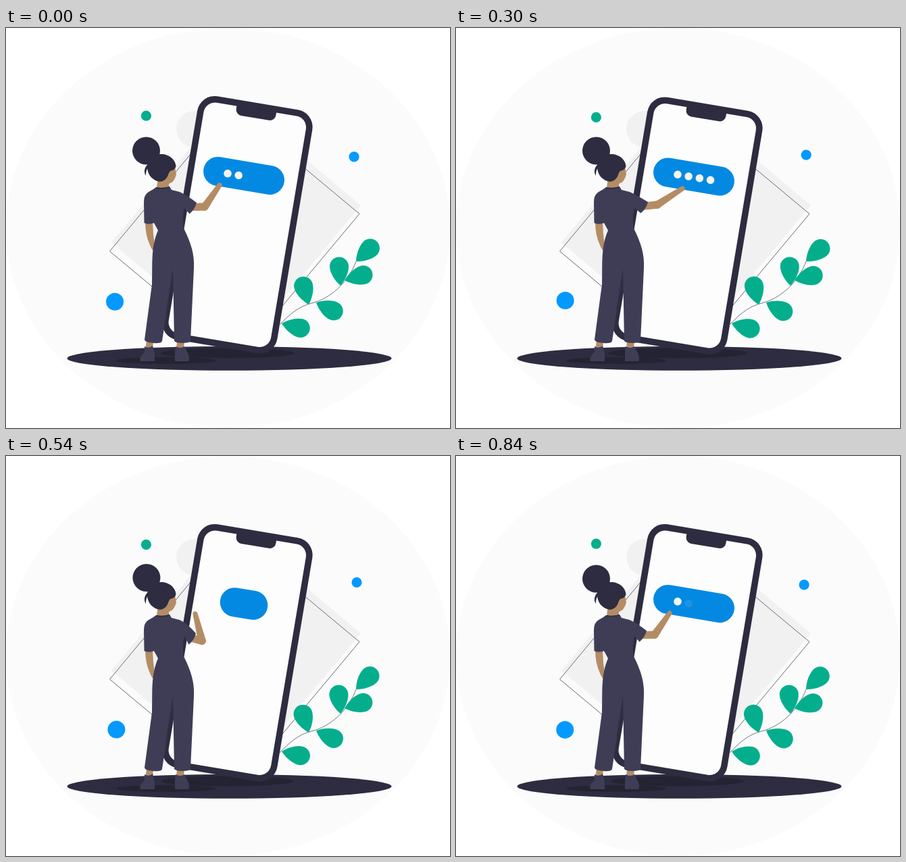
An HTML page with a canvas that plays this animation: 657 px wide and 593 px high, repeating every 0.87 s.

```html
<!DOCTYPE html>
<html lang="en">
<head>
<meta charset="utf-8">
<title>Passcode entry</title>
<style>
  html, body { margin: 0; width: 100%; height: 100%; overflow: hidden; background: #fff; }
  canvas { display: block; }
</style>
</head>
<body>
<canvas id="stage" width="657" height="593"></canvas>
<script>
const ctx = document.getElementById('stage').getContext('2d');
const LOOP = 870, STEP = 30, RAD = Math.PI / 180, TILT = 9.5 * RAD;
const INK = '#2d2c40', CLOTH = '#3f3d56', SKIN = '#b48c64';
const GREEN = '#04ae8d', BLUE = '#0489e2', SKY = '#0499ff', SHADE = '#242332';

const clamp = v => Math.max(0, Math.min(1, v));
const ramp = (from, to, t) => clamp((t - from) / (to - from));
const ease = (from, to, t) => { const p = ramp(from, to, t); return p * p * (3 - 2 * p); };
const mix = (a, b, p) => a + (b - a) * p;
const wave = (t, delay) => Math.sin(2 * Math.PI * (t - delay) / LOOP);

function ellipse(x, y, rx, ry, color) {
  ctx.fillStyle = color;
  ctx.beginPath();
  ctx.ellipse(x, y, rx, ry, 0, 0, 2 * Math.PI);
  ctx.fill();
}
const circle = (x, y, r, color) => ellipse(x, y, r, r, color);

function shape(d, color) {
  ctx.fillStyle = color;
  ctx.fill(new Path2D(d));
}

function line(d, color, width) {
  ctx.strokeStyle = color;
  ctx.lineWidth = width;
  ctx.stroke(new Path2D(d));
}

// Rounded box centred on the current origin.
function box(w, h, r, color) {
  ctx.fillStyle = color;
  ctx.beginPath();
  ctx.roundRect(-w / 2, -h / 2, w, h, r);
  ctx.fill();
}

function at(x, y, angle, draw) {
  ctx.save();
  ctx.translate(x, y);
  ctx.rotate(angle);
  draw();
  ctx.restore();
}

function drawBackdrop(press) {
  ctx.fillStyle = '#fff';
  ctx.fillRect(0, 0, 657, 593);
  ellipse(328.5, 296.5, 328.5, 296.5, '#fbfbfb');
  circle(279, 150, 27, '#f1f1f1');
  shape('M156 318L335 103L525 263L346 478Z', '#f1f1f1');
  line('M153.5 331L332 116L523 275.5L344 490Z', '#6b6a75', 1);
  ellipse(330.5, 489.8, 240, 18, INK);
  ellipse(237, 493, 73.5, 5, SHADE);
  ellipse(328, 482, 98 + press * 8, 7.5, SHADE);
}

function drawPhone(t, drop) {
  at(342.3, 291.7 + drop, TILT, () => {
    box(172.5, 366, 26, INK);
    box(153.5, 347, 17, '#fdfdfd');
    ctx.fillStyle = INK;
    ctx.beginPath();
    ctx.roundRect(-30, -175, 59.5, 14.5, [0, 0, 9, 9]);
    ctx.fill();
  });

  // The pill narrows, turns blue and widens again between entries.
  const narrow = t < 540 ? ramp(450, 540, t) ** 2.7 : (1 - ramp(540, 720, t)) ** 1.6;
  const green = t >= 330 && t < 540;
  const clock = t < 600 ? t + LOOP : t;
  at(352, 219 + drop, TILT, () => {
    box(121 - 50 * narrow, 43, 21.5, green ? GREEN : BLUE);
    for (let i = 0; i < 4; i++) {
      const born = 717 + 120 * i;
      ctx.globalAlpha = ramp(born, born + 30, clock) * (1 - ramp(1355, 1395, clock));
      circle(-24.2 + 16.4 * i, 0.8, 5.8, '#f4f4f4');
    }
  });
}

function drawLeaf(x, y, angle) {
  const d = 28.6, r = 14;
  at(x, y, angle, () => {
    ctx.fillStyle = GREEN;
    ctx.beginPath();
    ctx.moveTo(0, 0);
    ctx.bezierCurveTo(8, -8, d - 9, -r, d, -r);
    ctx.arc(d, 0, r, -Math.PI / 2, Math.PI / 2);
    ctx.bezierCurveTo(d - 9, r, 8, 8, 0, 0);
    ctx.fill();
  });
}

function drawPlant(t) {
  line('M404 441C418 426 432 413 452 408C480 401 506 378 518 346', '#77757f', 1);
  const sway = 0.033 * wave(t, 0);
  const leaf = (x, y, degrees) => drawLeaf(x, y, degrees * RAD + sway);
  leaf(408, 438, 14);
  leaf(448, 410, -106);
  leaf(459, 407, 26);
  leaf(495, 382, -94);
  leaf(501, 374, -16);
  leaf(518, 346, -43);
}

// Limb with round ends that tapers from radius r1 to r2.
function limb(x1, y1, r1, x2, y2, r2) {
  const a = Math.atan2(y2 - y1, x2 - x1), q = Math.PI / 2;
  ctx.fillStyle = SKIN;
  ctx.beginPath();
  ctx.arc(x1, y1, r1, a + q, a - q);
  ctx.arc(x2, y2, r2, a - q, a + q);
  ctx.fill();
}

function drawHead(lift) {
  shape('M225 221L223 237Q232 239 241 237V231Q249 229 252 217L250 206L236 210Z', SKIN);
  circle(207.5 + 0.4 * lift, 182 - 1.5 * lift, 20.5, INK);
  shape('M209 206C209 194 219 187 230 187C241 187 251 195 251.5 205C250 210 247 211 243 212' +
        'C240 215 240 220 237 223C234 227 228 229 224 227C215 224 209 216 209 206Z', INK);
  shape('M211 201C205 206 203 213 207 219C207 213 208 208 212 206Z', INK);
}

function drawWoman(t) {
  // The hand slides along the pill, drops back, then reaches out again.
  const reach = 1 - ease(300, 430, t) + ease(660, 810, t);
  const slide = t < 600 ? ramp(0, 300, t) ** 2 : 0;
  const elbow = [mix(290, 294 + 4 * slide, reach), mix(274, 265 - 3 * slide, reach)];
  const hand = [mix(280, 316 + 19 * slide, reach), mix(234, 233 + 5 * slide, reach)];
  const cuffX = mix(281, 282 + 2 * slide, reach), cuffY = mix(263, 259 - slide, reach);

  // feet and resting arm
  shape('M208 464H218L217 477H206ZM253 464H264L263 476H252Z', SKIN);
  shape('M205 472Q211 476 217 471L220 483V494H199Q196 488 205 481Z' +
        'M251 472Q258 476 264 472L270 484Q272 490 270 494H250L250 481Z', CLOTH);
  shape('M206 287L217 287L218 306L221 331Q217 332 213 322Q206 307 206 287Z', SKIN);

  drawHead(1 - reach);
  limb(cuffX - 9, cuffY + 6.5, 5.5, ...elbow, 5.8);
  limb(...elbow, 5.8, ...hand, 3.6);

  // jumpsuit
  shape('M218 239L222 236Q232 238 242 235L245 240L257 243Q268 248 ' +
        `${cuffX} ${cuffY}q-2.5 10 -10.5 16.5` +
        'L264 267Q260 281 263 297C274 319 279 336 278 356L273 464Q272 467 261 467Q251 467 249 464' +
        'L247 358L231 464Q230 468 218 467Q205 466 205 462L216 380C217 350 214 325 225 300' +
        'L219 289Q211 292 204.5 289L204 258Q204 247 211 243Z', CLOTH);
  line('M222 237Q232 239 242 236', INK, 1.5);
  shape('M247 355L241 390L236 425L245 380Z', '#343349');
}

function drawFloaters(t) {
  circle(207.4, 131.2 + 1.3 * wave(t, 120), 7.6, GREEN);
  const drift = wave(t, 235);
  circle(517.2 + 2.2 * drift, 189 - 1.9 * drift, 7.6, SKY);
  circle(162 + 1.4 * wave(t, 330), 405.2 - 1.2 * wave(t, 60), 13, SKY);
}

function render(t) {
  const press = Math.sin(Math.PI * ramp(210, 510, t)) ** 2;
  drawBackdrop(press);
  drawPhone(t, 2.3 * press);
  drawPlant(t);
  drawWoman(t);
  drawFloaters(t);
}

let start;
function tick(now) {
  start ??= now;
  render(Math.floor(((now - start) % LOOP) / STEP) * STEP);
  requestAnimationFrame(tick);
}
render(0);
requestAnimationFrame(tick);
</script>
</body>
</html>
```
